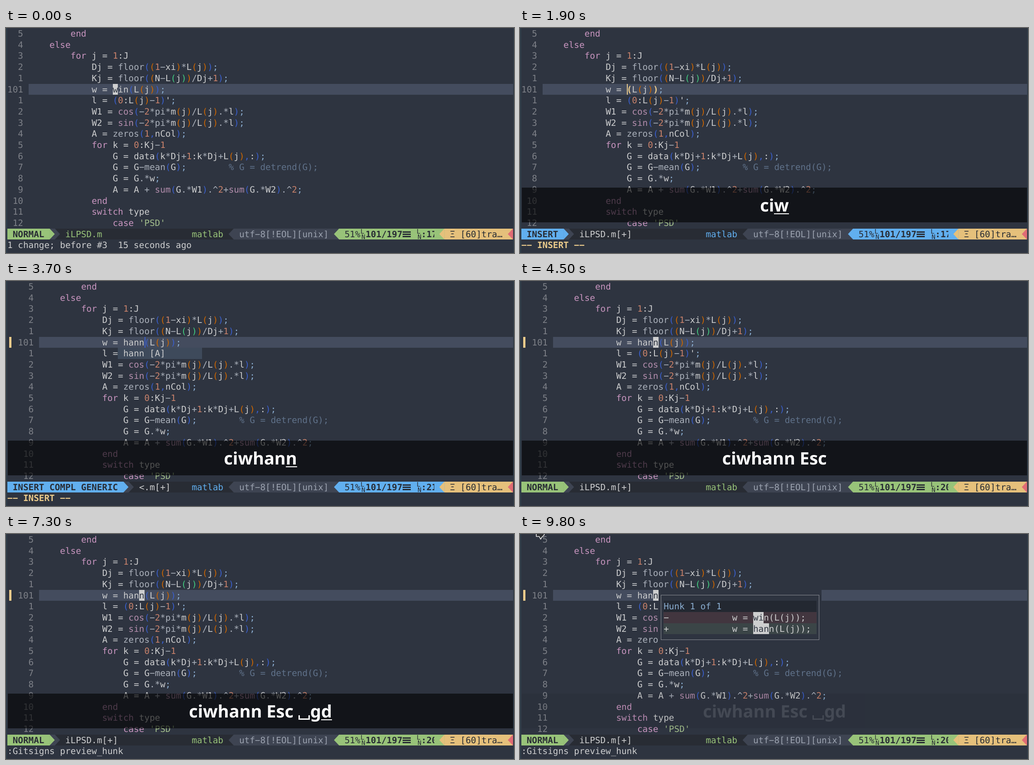
An HTML page for the animation above (9.9 s loop, 1122 by 499 pixels).

```html
<!DOCTYPE html>
<html lang="en">
<head>
<meta charset="utf-8">
<title>Editing a line and previewing the hunk</title>
<style>
  html, body { margin: 0; width: 100%; height: 100%; overflow: hidden; background: #2f3b47; }
  body { text-rendering: geometricPrecision; }
  #stage { position: absolute; left: 0; top: 0; width: 1122px; height: 499px; overflow: hidden; }
  #paper { position: absolute; left: 3px; top: 0; width: 1117px; height: 499px; background: #2e3440; }
  #screen { font: 19.326px/25px "DejaVu Sans Mono", monospace; }
  #screen i, #screen s { position: absolute; font-style: normal; text-decoration: none; white-space: pre; }
  #screen .bold { font-weight: bold; }
  #screen .small { font-size: 14px; line-height: 14px; }
  #screen .cut { width: 28.5px; overflow: hidden; font-weight: bold; }
  #screen .right { clip-path: polygon(0 0, 100% 50%, 0 100%); }
  #screen .left { clip-path: polygon(100% 0, 0 50%, 100% 100%); }
  #screen .frame { box-sizing: border-box; border: 1.5px solid #8b8e95; }
  #keys { position: absolute; left: 4px; top: 354px; width: 1116px; height: 77px; background: rgba(0, 0, 0, .61);
    color: #fff; font: bold 38px/79px "Noto Sans", "Open Sans", sans-serif; text-align: center; white-space: pre; }
  #keys u { position: relative; text-decoration: none; }
  #keys u.fresh::after { content: ""; position: absolute; left: 0; right: 0; bottom: 6px; height: 2px; background: #fff; }
  #keys .blank { display: inline-block; width: 19px; height: 7px; margin: 0 1px -5px; border: 3px solid #fff; border-top: 0; }
  #keys u.fresh .blank { background: linear-gradient(#fff, #fff) 0 3px / 100% 2px no-repeat; }
  #mouse { position: absolute; left: 0; top: 0; overflow: visible; }
</style>
</head>
<body>
<div id="stage">
  <div id="paper"></div>
  <div id="screen"></div>
  <div id="keys"></div>
  <svg id="mouse" width="24" height="20">
    <path d="M1-8V9.5H7.5L10.5 15.5L13.5 11L18.5 6V-8Z" fill="#2b2d31" stroke="#eee" stroke-width="1.6" stroke-linejoin="round"/>
  </svg>
</div>
<script>
const LOOP = 9900, CELL = 11.635, ROW = 24.7, CURRENT = 5;
const C = {
  bg: '#2e3440', fg: '#cdcecf', dim: '#abb1bb', gutter: '#7e8188', line: '#444c5e', keyword: '#c895bf',
  builtin: '#b48ead', number: '#c9826b', string: '#a3be8c', comment: '#60728a', blue: '#8cafd2',
  yellow: '#ebcb8b', menu: '#3e4a5b', title: '#232831', removed: '#42363f', added: '#3b4547',
  bar: '#282c34', section: '#3e4452', normal: '#98c379', insert: '#61afef', warn: '#e5c07b', error: '#e06c75'
};
const RAINBOW = ['#3a5fcd', '#cd6600', '#43cd80'];
const CODE = [
  [8, 'end'], [4, 'else'], [8, 'for j = 1:J'], [12, 'Dj = floor((1-xi)*L(j));'],
  [12, 'Kj = floor((N-L(j))/Dj+1);'], [12, ''], [12, "l = (0:L(j)-1)';"],
  [12, 'W1 = cos(-2*pi*m(j)/L(j).*l);'], [12, 'W2 = sin(-2*pi*m(j)/L(j).*l);'],
  [12, 'A = zeros(1,nCol);'], [12, 'for k = 0:Kj-1'], [16, 'G = data(k*Dj+1:k*Dj+L(j),:);'],
  [16, 'G = G-mean(G);        % G = detrend(G);'], [16, 'G = G.*w;'],
  [16, 'A = A + sum(G.*W1).^2+sum(G.*W2).^2;'], [12, 'end'], [12, 'switch type'], [16, "case 'PSD'"]
];
const WORDS = ['hann', 'href', 'https', 'helps', 'handle', 'Hz'];
// start time, key, how long its underline stays
const KEYS = [
  [700, 'c'], [1100, 'i'], [1900, 'w'], [3100, 'h', 100], [3400, 'a'], [3500, 'n'], [3700, 'n'],
  [4300, ' Esc'], [6300, ' \u2423'], [6900, 'g'], [7300, 'd']
];
const POINTER = [[9000, 36, 0], [9100, 2, -3], [9300, 16, 1], [9400, 29, 0], [9600, 35, -4]];

const x = col => 3 + col * CELL;
const y = row => row * ROW;
const at = (steps, t) => steps.filter(s => s[0] <= t).pop();
const escapeText = s => s.replace(/&/g, '&amp;').replace(/</g, '&lt;').replace(/-/g, '\u2212');

const label = (left, top, s, color, cls = '') =>
  `<i class="${cls}" style="left:${left}px;top:${Math.round(top)}px;color:${color}">${escapeText(s)}</i>`;
const text = (col, row, s, color = C.fg, cls) => label(x(col), y(row), s, color, cls);
const rect = (left, top, w, h, color, cls = '') =>
  `<s class="${cls}" style="left:${left}px;top:${top}px;width:${w}px;height:${h}px;background:${color}"></s>`;
const cells = (col, row, cols, color, cls, rows = 1) => rect(x(col), y(row), cols * CELL, rows * ROW, color, cls);

function tokenColor(s) {
  if (/^(end|else|for|switch|case)$/.test(s)) return C.keyword;
  if (/^(cos|sin|sum)$/.test(s)) return C.builtin;
  if (/^(floor|zeros|mean|pi|[-+*\/^.])$/.test(s)) return C.dim;
  if (/^\d/.test(s)) return C.number;
  if (s[0] === '%') return C.comment;
  if (/^'\w/.test(s)) return C.string;
  return s === ';' ? C.blue : C.fg;
}

function codeLine(col, row, source, matched) {
  let depth = 0, html = '';
  for (const m of source.matchAll(/%.*|'\w+'|[A-Za-z]\w*|\d+|\S/g)) {
    const s = m[0];
    let color = tokenColor(s), cls = '';
    if (s === ')') depth--;
    if ('(),'.includes(s)) {
      const level = s === ',' ? depth - 1 : depth;
      color = RAINBOW[level];
      if (matched && level === 0) { color = C.yellow; cls = 'bold'; }
    }
    if (s === '(') depth++;
    html += text(col + m.index, row, s, color, cls);
  }
  return html;
}

function cursor(s) {
  const left = x(s.cursorCol), top = y(CURRENT);
  if (s.shape === 'beam') return rect(left, top, 2, ROW, s.matched ? C.yellow : RAINBOW[0]);
  if (s.shape === 'under') return rect(left, top + ROW - 3, CELL, 2, C.fg);
  return rect(left, top, CELL, ROW, C.fg) + text(s.cursorCol, CURRENT, s.cursorChar, C.bg);
}

function menu(word) {
  const words = WORDS.filter(w => w.toLowerCase().startsWith(word));
  const widest = Math.max(...words.map(w => w.length));
  return cells(21, 6, 16, C.menu, '', words.length) +
    words.map((w, i) => text(22, 6 + i, w.padEnd(widest + 1) + '[A]')).join('');
}

function hunkRow(row, sign, word, changed, color) {
  return cells(27, row, 29, color) + text(27, row, sign) + text(40, row, 'w =') +
    cells(44, row, changed, C.fg) + text(44, row, word.slice(0, changed), C.bg) +
    text(44 + changed, row, word.slice(changed) + '(L(j));');
}

function hunk() {
  return cells(26, 5, 31, C.bg, '', 5) +
    rect(x(26.5), y(5.5) - 1, 30 * CELL + 1, 4 * ROW + 1, 'none', 'frame') +
    cells(27, 6, 29, C.title) + text(27, 6, 'Hunk 1 of 1', C.blue) +
    hunkRow(7, '-', 'win', 2, C.removed) + hunkRow(8, '+', 'hann', 3, C.added);
}

const lineMark = left =>
  label(left, y(18), 'L', C.bar, 'small') + label(left + 2, y(18) + 12, 'N', C.bar, 'small');

function statusBar(s) {
  const r = 18, mode = s.insert ? C.insert : C.normal;
  const end = s.mode.length + 2;
  return cells(0, r, 96, C.bar) +
    cells(0, r, end, mode) + text(1, r, s.mode, C.bar, 'bold') +
    cells(end, r, 1, C.section) + cells(end, r, 1, mode, 'right') + cells(end + 1, r, 1, C.section, 'right') +
    text(end + 3, r, s.file, s.edited ? C.fg : C.normal) + text(35, r, 'matlab', mode) +
    cells(42, r, 1, C.section, 'left') + cells(43, r, 20, C.section) +
    text(44, r, 'utf-8[!EOL][unix]', '#9ca3b0') +
    cells(62, r, 1, mode, 'left') + cells(63, r, 20, mode) +
    text(64, r, '51%', C.bar) + lineMark(783) + text(68, r, '101/197', C.bar, 'bold') +
    [6, 11, 16].map(d => rect(876, y(r) + d, 18, 3, C.bar)).join('') +
    lineMark(907) + label(917, y(r), ':' + s.column, C.bar, 'cut') +
    cells(82, r, 1, C.warn, 'left') + cells(83, r, 13, C.warn) +
    text(84, r, '\u039e', C.bar) + text(86, r, '[60]tra\u2026', C.bar) +
    cells(95, r, 1, C.error, 'left');
}

function stateAt(t) {
  const insert = t >= 1900 && t < 4300;
  const word = at([[0, 'win'], [1900, ''], [3100, 'h'], [3400, 'ha'], [3600, 'han'], [3700, 'hann']], t)[1];
  const completing = t >= 3100 && t < 4300;
  const offset = insert ? word.length : t < 1900 ? 0 : 3;
  const gutter = t < 2000 ? 4 : 6;
  return {
    insert, word, completing, gutter,
    edited: t >= 1900,
    mode: completing ? 'INSERT COMPL GENERIC' : insert ? 'INSERT' : 'NORMAL',
    file: completing ? '<.m[+]' : t < 1900 ? 'iLPSD.m' : 'iLPSD.m[+]',
    matched: insert && !completing,
    shape: insert ? 'beam' : t >= 700 && t < 1900 ? 'under' : 'block',
    cursorCol: gutter + 16 + offset,
    cursorChar: word[offset],
    column: 17 + offset,
    message: at([[0, '1 change; before #3  15 seconds ago'], [1900, '-- INSERT --'], [4300, ''],
      [7300, ':Gitsigns preview_hunk']], t)[1],
    pending: at([[0, ''], [700, 'c'], [1100, 'ci'], [1900, ''], [6300, '<20>'], [6900, '<20>g'], [7300, '']], t)[1],
    hunk: t >= 7400
  };
}

function screenHtml(s) {
  let html = cells(s.gutter, CURRENT, 96 - s.gutter, C.line);
  CODE.forEach(([indent, source], row) => {
    const here = row === CURRENT;
    const number = here ? '101' : String(Math.abs(row - CURRENT)).padStart(3);
    html += text(s.gutter - 4, row, number, C.gutter) +
      codeLine(s.gutter + indent, row, here ? `w = ${s.word}(L(j));` : source, here && s.matched);
  });
  if (s.gutter > 4) html += rect(7, y(CURRENT), 5, ROW, C.yellow);
  html += cursor(s);
  if (s.completing) html += menu(s.word);
  if (s.hunk) html += hunk();
  return html + statusBar(s) +
    text(0, 19, s.message, s.insert ? C.yellow : C.fg, s.insert ? 'bold' : '') + text(85, 19, s.pending);
}

function keysHtml(t) {
  const typed = KEYS.filter(k => k[0] <= t);
  return typed.map(([start, key, hold = 200], i) => {
    const fresh = i === typed.length - 1 && t < start + hold;
    const name = key.trim();
    const glyph = name === '\u2423' ? '<span class="blank"></span>' : name;
    return (key[0] === ' ' ? ' ' : '') + `<u class="${fresh ? 'fresh' : ''}">${glyph}</u>`;
  }).join('');
}

const find = id => document.getElementById(id);
const screenBox = find('screen'), keysBox = find('keys'), mouse = find('mouse');
const shown = new Map();
function update(box, html) {
  if (shown.get(box) === html) return;
  shown.set(box, html);
  box.innerHTML = html;
}

let lastTick = -1;
function draw() {
  const tick = Math.floor(performance.now() % LOOP / 100);
  if (tick !== lastTick) {
    lastTick = tick;
    const t = tick * 100;
    update(screenBox, screenHtml(stateAt(t)));
    update(keysBox, keysHtml(t));
    keysBox.style.opacity = t < 700 ? 0 : t < 9600 ? 1 : .7 - .3 * (t - 9600) / 100;
    const spot = at(POINTER, t);
    mouse.style.display = spot ? 'block' : 'none';
    if (spot) mouse.style.transform = `translate(${spot[1]}px, ${spot[2]}px)`;
  }
  requestAnimationFrame(draw);
}
draw();
</script>
</body>
</html>
```
